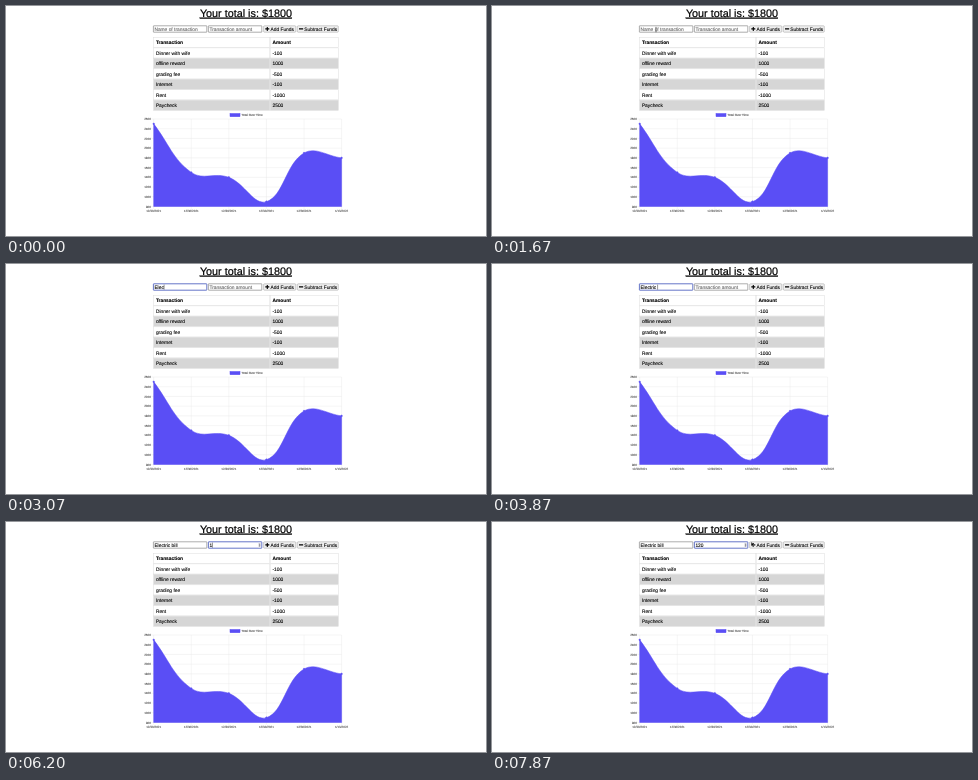
Recreate the animation shown at these times as an HTML page. Size 480 px wide and 230 px high, loop 8 s.

```html
<!DOCTYPE html>
<html lang="en">
<head>
<meta charset="utf-8">
<title>Budget tracker</title>
<style>
html, body { margin: 0; width: 100%; height: 100%; overflow: hidden; background: #fff; }
svg { display: block; width: 480px; height: 230px; }
text { font: 4.85px "Liberation Sans", Arial, sans-serif; text-rendering: geometricPrecision; white-space: pre; stroke: #000; stroke-width: .1; }
.title { font-size: 10.8px; text-anchor: middle; text-decoration: underline; stroke-width: .2; }
.bold { font-weight: bold; }
.hint { fill: #666; stroke: #666; }
.tick { font-size: 3px; fill: #555; stroke: #555; }
.field { fill: #fff; stroke: #767676; stroke-width: .6; }
.field.focus { stroke: #5567c2; stroke-width: .9; }
.button { fill: #efefef; stroke: #8a8a8a; stroke-width: .4; }
.icon { stroke: #000; stroke-width: 1.1; }
.cell { stroke: #ddd; stroke-width: .5; }
.grid { stroke: #e6e6e6; stroke-width: .4; }
.area { fill: #5a4ef5; stroke: #5a4ef5; stroke-width: .5; }
</style>
</head>
<body>
<svg id="stage" viewBox="0 0 480 230">
  <text class="title" x="239.9" y="10.6">Your total is: $1800</text>
  <g id="form">
    <rect id="nameBox" class="field" x="147.4" y="19.8" width="53.4" height="6.4" rx=".3"/>
    <rect id="amountBox" class="field" x="202.4" y="19.8" width="53.4" height="6.4" rx=".3"/>
    <text id="name" x="148.4" y="24.6"></text>
    <text id="amount" x="203.4" y="24.6"></text>
    <g id="spinner">
      <rect x="252.2" y="20.7" width="2.8" height="4.8" rx=".6" fill="#e4e4e8"/>
      <path d="M252.9 22.6l.7-1.1.7 1.1zM252.9 23.6l.7 1.1.7-1.1z" fill="#445"/>
    </g>
    <rect id="caret" y="20.6" width=".4" height="5"/>
    <rect class="button" x="257.6" y="19.8" width="32.2" height="6.4" rx=".8"/>
    <rect class="button" x="291.3" y="19.8" width="41" height="6.4" rx=".8"/>
    <path class="icon" d="M259.3 22.9h4M261.3 20.9v4M293 22.9h4.2"/>
    <text x="264.5" y="24.6">Add Funds</text>
    <text x="298.3" y="24.6">Subtract Funds</text>
  </g>
  <g id="table"></g>
  <g id="chart"></g>
  <path id="arrow" d="M0 0V4.4L1 3.5 1.7 5 2.4 4.7 1.8 3.2H3.1Z" stroke="#fff" stroke-width=".3"/>
  <path id="beam" d="M-.8 -2.3Q0 -2.3 0 -1.8V1.8Q0 2.3 -.8 2.3M.8 -2.3Q0 -2.3 0 -1.8M0 1.8Q0 2.3 .8 2.3" fill="none" stroke="#222" stroke-width=".4"/>
</svg>
<script>
const $ = id => document.getElementById(id);
const show = (el, on) => el.setAttribute('visibility', on ? 'visible' : 'hidden');

function add(parent, tag, attrs, text = '') {
  const el = document.createElementNS('http://www.w3.org/2000/svg', tag);
  for (const key in attrs) el.setAttribute(key, attrs[key]);
  el.textContent = text;
  return parent.appendChild(el);
}

function drawTable() {
  const rows = [['Transaction', 'Amount'], ['Dinner with wife', '-100'], ['offline reward', '1000'],
    ['grading fee', '-500'], ['Internet', '-100'], ['Rent', '-1000'], ['Paycheck', '2500']];
  rows.forEach((row, i) => {
    const y = 31.4 + i * 10.47;
    const fill = i && i % 2 === 0 ? '#d6d6d6' : '#fff';
    [[147.6, 116.2], [264.2, 68.1]].forEach(([x, width], j) => {
      add($('table'), 'rect', { class: 'cell', x, y, width, height: 10.1, fill });
      add($('table'), 'text', { class: i ? '' : 'bold', x: x + 2.3, y: y + 6.9 }, row[j]);
    });
  });
}

function drawChart() {
  const chart = $('chart'), left = 147.7, right = 335.6, top = 113, bottom = 200.5;
  const yOf = v => bottom - (v - 800) / 1800 * (bottom - top);
  const clampY = y => Math.max(top, Math.min(bottom, y));
  const pts = [2500, 1500, 1400, 900, 1900, 1800].map((v, i) => [left + i * (right - left) / 5, yOf(v)]);

  add(chart, 'rect', { class: 'area', x: 224, y: 107.5, width: 10, height: 3.2 });
  add(chart, 'text', { class: 'tick', x: 235.6, y: 110.1 }, 'Total Over Time');
  for (let v = 800; v <= 2600; v += 200) {
    const y = yOf(v);
    add(chart, 'path', { class: 'grid', d: `M${left - 2.4} ${y}H${right}` });
    add(chart, 'text', { class: 'tick', x: left - 2.8, y: y + 1.1, 'text-anchor': 'end' }, v);
  }
  pts.forEach(([x], i) => {
    add(chart, 'path', { class: 'grid', d: `M${x} ${top}V${bottom + 2.4}` });
    add(chart, 'text', { class: 'tick', x, y: 206, 'text-anchor': 'middle' }, i < 5 ? '12/30/2021' : '1/13/2022');
  });

  // Spline handles follow the neighbours, weighted by distance
  const handles = pts.map((p, i) => {
    const a = pts[i - 1] || p, b = pts[i + 1] || p;
    const da = Math.hypot(p[0] - a[0], p[1] - a[1]), db = Math.hypot(b[0] - p[0], b[1] - p[1]);
    const handle = k => [p[0] + k * (b[0] - a[0]), clampY(p[1] + k * (b[1] - a[1]))];
    return [handle(-.4 * da / (da + db)), handle(.4 * db / (da + db))];
  });
  let d = `M${left} ${bottom}L${pts[0]}`;
  for (let i = 1; i < pts.length; i++) d += `C${handles[i - 1][1]} ${handles[i][0]} ${pts[i]}`;
  add(chart, 'path', { class: 'area', d: d + `V${bottom}Z` });
  for (const [cx, cy] of pts) add(chart, 'circle', { class: 'area', cx, cy, r: .8 });
}

// All times below are in ticks of 1/15 s
const FOCUS = 26, TAB = 73, LOOP = 120;
const nameKeys = [38, 40, 42, 46, 49, 52, 54, 56, 58, 62, 64, 66, 68];
const amountKeys = [93, 102, 105];
const caretOff = [[33, 38], [80, 88], [100, 102], [112, LOOP]];
const paths = [
  [[7, 33, 88], [8, 42, 81], [10, 74, 70], [11, 106.5, 60], [13, 116, 55], [19, 151, 35], [25, 164, 23.6], [38, 164, 23.6]],
  [[113, 206, 22], [116, 244, 19], [118, 259.2, 19.8], [LOOP, 259.2, 19.8]]
];

const typed = (text, keys, n) => text.slice(0, keys.filter(k => k <= n).length);

function pointer(n) {
  for (const path of paths)
    for (let i = 1; i < path.length; i++) {
      const [a, ax, ay] = path[i - 1], [b, bx, by] = path[i];
      if (n >= a && n < b) {
        const k = (n - a) / (b - a);
        return [ax + (bx - ax) * k, ay + (by - ay) * k];
      }
    }
}

function setField(id, value, hint, focused) {
  const el = $(id);
  el.textContent = value || hint;
  el.classList.toggle('hint', !value);
  $(id + 'Box').classList.toggle('focus', focused);
  if (focused) $('caret').setAttribute('x', +el.getAttribute('x') + (value ? el.getComputedTextLength() : 0));
}

function draw(n) {
  setField('name', typed('Electric bill', nameKeys, n), 'Name of transaction', n >= FOCUS && n < TAB);
  setField('amount', typed('120', amountKeys, n), 'Transaction amount', n >= TAB);
  show($('spinner'), n >= TAB);
  show($('caret'), n >= FOCUS && !caretOff.some(([a, b]) => n >= a && n < b));

  const at = pointer(n);
  const inField = n >= 24 && n < 38 || n >= 113 && n < 117;
  for (const id of ['arrow', 'beam']) {
    show($(id), at && inField === (id === 'beam'));
    if (at) $(id).setAttribute('transform', `translate(${at})`);
  }
}

let last = -1;
function tick() {
  const n = Math.floor(performance.now() % 8000 * 15 / 1000);
  if (n !== last) draw(last = n);
  requestAnimationFrame(tick);
}

drawTable();
drawChart();
tick();
</script>
</body>
</html>
```
